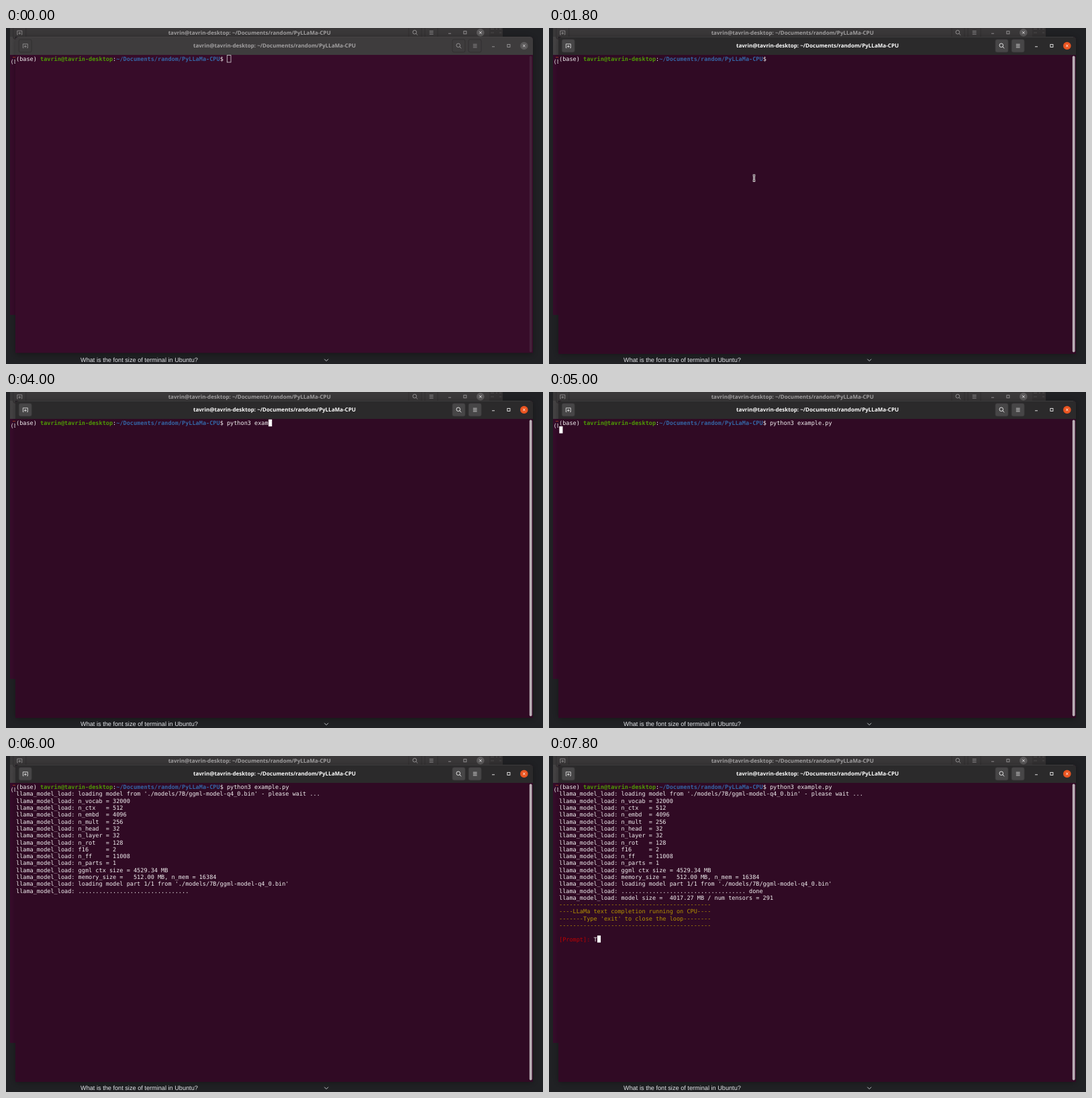
An HTML page for the animation above (8000 ms loop, 800 by 500 pixels).

```html
<!DOCTYPE html>
<html lang="en">
<head>
<meta charset="utf-8">
<title>Terminal session</title>
<style>
  html, body { margin: 0; width: 100%; height: 100%; overflow: hidden; background: #202124; }
  svg { display: block; width: 800px; height: 500px; }
  text { white-space: pre; text-rendering: geometricPrecision; }
  .title { font: 700 8.05px "Noto Sans", sans-serif; text-anchor: middle; }
  .term { font: 8.55px "DejaVu Sans Mono", monospace; fill: #f2f0f1; }
  .user { fill: #4e9a06; font-weight: 700; }
  .path { fill: #3465a4; font-weight: 700; }
  .note { fill: #b49300; }
  .ask { fill: #c00000; }
  .page { font: 9.18px "Liberation Sans", Arial, sans-serif; fill: #e4e6ea; }
</style>
</head>
<body>
<svg id="stage" viewBox="0 0 800 500">
  <defs>
    <filter id="blur" x="-10%" y="-10%" width="120%" height="120%"><feGaussianBlur stdDeviation="4"/></filter>
    <clipPath id="behind"><path d="M0 0H800V13H14V500H0Z"/></clipPath>
  </defs>
  <rect width="800" height="500" fill="#202124"/>
  <text class="page" x="111" y="497">What is the font size of terminal in Ubuntu?</text>
  <path d="M474.3 492.7l2.9 2.9 2.9-2.9" fill="none" stroke="#c4c7cb"/>

  <g clip-path="url(#behind)">
    <rect x="700" y="-5" width="40" height="18" fill="#343233"/>
    <path d="M722 1.5h5M730 1.5h2M735 1.5h3M722 7h5M735 7h3" stroke="#4a4849"/>
    <rect x="6" y="-7" width="714" height="434" fill="#370c2b"/>
    <rect x="6" y="-7" width="714" height="47" fill="#454344"/>
    <g id="backBar"></g>
    <path d="M10 43.5h4" stroke="#a03a2a"/>
    <text class="term" x="6.5" y="53">(base)</text>
  </g>

  <rect x="14" y="14" width="771" height="472" rx="5" opacity=".32" filter="url(#blur)"/>
  <g id="idle"></g>
  <g id="active"></g>
  <g id="screen"></g>
  <rect id="cursor"/>
  <g id="pointer" fill="none">
    <path d="M-1.8-4.2H1.8M0-4.2V4.2M-1.8 4.2H1.8" stroke="#e4e0e2" stroke-width="2.8"/>
    <path d="M-1.8-4.2H1.8M0-4.2V4.2M-1.8 4.2H1.8" stroke="#3a2a34" stroke-width=".8"/>
  </g>
</svg>
<script>
const $ = id => document.getElementById(id);
const USER = 'tavrin@tavrin-desktop', FOLDER = '~/Documents/random/PyLLaMa-CPU';
const LOOP = 8000, STEP = 200, LEFT = 15, TOP = 40.8, CELL = 5.148, LINE = 10.29;

const button = (x, look) =>
  `<rect x="${x - 9.5}" y="17" width="19" height="19" rx="2.5" fill="${look.button}" stroke="${look.edge}" stroke-width=".8"/>`;

// Title bar parts in front-window coordinates; the shifts place them in another window.
const titleBar = (look, left = 0, middle = 0, right = 0, dy = 0) => `
  <g transform="translate(${left} ${dy})">${button(28.7, look)}
    <path d="M26.4 29.6h-1.1v-5.8h7v5.8h-1.1M28.8 25.4v4M26.8 27.4h4" fill="none" stroke="${look.ink}" stroke-width=".8"/></g>
  <text class="title" x="${400 + middle}" y="${29.4 + dy}" fill="${look.text}">${USER}: ${FOLDER}</text>
  <g transform="translate(${right} ${dy})" fill="none" stroke="${look.ink}" stroke-width=".9">${button(674.5, look)}${button(698.6, look)}
    <circle cx="673.8" cy="25.8" r="2.8"/><path d="M675.9 27.9l2.4 2.4"/>
    <path d="M695.8 24.3h5.8M695.8 26.6h5.8M695.8 28.9h5.8" stroke-width=".8"/>
    <path d="M724 27.8h4"/><rect x="746.9" y="24.4" width="4" height="4"/>
    <circle cx="771.8" cy="26.5" r="5.8" fill="${look.close}" stroke="none"/>
    <path d="M770.1 24.8l3.4 3.4M773.5 24.8l-3.4 3.4" stroke="${look.cross}"/></g>`;

const frontWindow = (look, bottom) => `
  <path d="M14 ${bottom}V18q0-5 5-5H780q5 0 5 5V${bottom}Z" fill="${look.paper}"/>
  <path d="M14 40V18q0-5 5-5H780q5 0 5 5V40Z" fill="${look.bar}"/>
  <path d="M18 13.5H781" stroke="${look.shine}" stroke-width=".8"/>
  <rect x="779.8" y="41.5" width="3.8" height="441" rx="1.9" fill="${look.scroll}"/>
  ${titleBar(look)}`;

const dim = { paper: '#370c29', bar: '#3e3c3d', shine: '#484647', scroll: '#45213a', button: '#3e3c3d',
  edge: '#302e2f', ink: '#9b999a', text: '#a3a1a2', close: '#5c5a5b', cross: '#e6e4e5' };
const lit = { paper: '#300a24', bar: '#2b2a2b', shine: '#403f40', scroll: '#b9aeb5', button: '#474647',
  edge: '#3a393a', ink: '#f0f0f0', text: '#fff', close: '#e95420', cross: '#fff' };

$('backBar').innerHTML = '<rect x="6" y="-7" width="714" height="20" fill="#3a3839"/>' +
  titleBar({ ...dim, button: '#3a3839' }, -8.5, -37.3, -65, -19.6);
$('idle').innerHTML = frontWindow(dim, 483.5);
$('active').innerHTML = frontWindow(lit, 485);

// Value of the last entry whose time has come.
const at = (table, t) => table.reduce((value, [time, next]) => t >= time ? next : value, table[0][1]);

const COMMAND = 'python3 example.py';
const typed = [[0, 0], [2400, 1], [2600, 3], [2800, 6], [3000, 7], [3600, 9], [3800, 10],
  [4000, 12], [4200, 14], [4400, 16], [4600, 18]];
const focus = [[0, 0], [1200, 0.5], [1400, 1]];
const keyTimes = [1200, ...typed.slice(1).map(([time]) => time), 5000, 7800];

const params = { n_vocab: 32000, n_ctx: 512, n_embd: 4096, n_mult: 256, n_head: 32, n_layer: 32,
  n_rot: 128, f16: 2, n_ff: 11008, n_parts: 1 };
const MODEL = "'./models/7B/ggml-model-q4_0.bin'";
const header = [
  `loading model from ${MODEL} - please wait ...`,
  ...Object.entries(params).map(([name, value]) => `${name.padEnd(7)} = ${value}`),
  'ggml ctx size = 4529.34 MB',
  'memory_size =   512.00 MB, n_mem = 16384',
  `loading model part 1/1 from ${MODEL}`
];
const rule = '-'.repeat(44);
const banner = [rule, '----LLaMa text completion running on CPU----',
  "-------Type 'exit' to close the loop--------", rule];

// Each line is a list of [text, class] runs.
function linesAt(t) {
  const log = text => [['llama_model_load: ' + text]];
  const lines = [[['(base) '], [USER, 'user'], [':'], [FOLDER, 'path'],
    ['$ ' + COMMAND.slice(0, at(typed, t))]]];
  if (t >= 5200) {
    const done = t >= 6200;
    const dots = Math.min(36, (t - 5200) / STEP * 8);
    lines.push(...header.map(log), log('.'.repeat(dots) + (done ? ' done' : '')));
    if (done) lines.push(log('model size =  4017.27 MB / num tensors = 291'));
  }
  if (t >= 6400) {
    lines.push(...banner.map(text => [[text, 'note']]), [],
      [['[Prompt]: ', 'ask'], [t >= 7800 ? 'T' : '']]);
  } else if (t >= 6200 || t >= 5000 && t < 5200) lines.push([]);
  return lines;
}

function set(node, attributes) {
  for (const name in attributes) node.setAttribute(name, attributes[name]);
}

function draw(t) {
  const lines = linesAt(t), row = lines.length - 1;
  $('screen').innerHTML = lines.map((runs, i) =>
    `<text class="term" x="${LEFT}" y="${TOP + 8.4 + i * LINE}">` +
    runs.map(([text, kind = '']) => `<tspan class="${kind}">${text}</tspan>`).join('') + '</text>').join('');

  // The cursor blinks every 600 ms, counted from the last key press.
  const lastKey = Math.max(0, ...keyTimes.filter(time => time <= t));
  const focused = t >= 1200;
  const on = !focused || Math.floor((t - lastKey) / 600) % 2 === 0;
  const column = lines[row].reduce((sum, [text]) => sum + text.length, 0);
  set($('cursor'), {
    x: LEFT + column * CELL + 0.3, y: TOP + row * LINE - (focused ? 0 : 0.2),
    width: focused ? CELL : 5.7, height: 10.4, visibility: on ? 'visible' : 'hidden',
    fill: focused ? '#fff' : 'none', stroke: focused ? 'none' : '#d8d2d6', 'stroke-width': 0.8
  });
  set($('active'), { opacity: at(focus, t) });

  const away = Math.max(0, (1000 - t) / 600) ** 2;
  set($('pointer'), {
    transform: `translate(${305.5 + 110 * away} ${223.3 + 240 * away})`,
    visibility: t >= 400 && t < 2400 ? 'visible' : 'hidden'
  });
}

let shown = -1;
function tick() {
  const t = Math.floor(performance.now() % LOOP / STEP) * STEP;
  if (t !== shown) draw(shown = t);
  requestAnimationFrame(tick);
}
tick();
</script>
</body>
</html>
```
